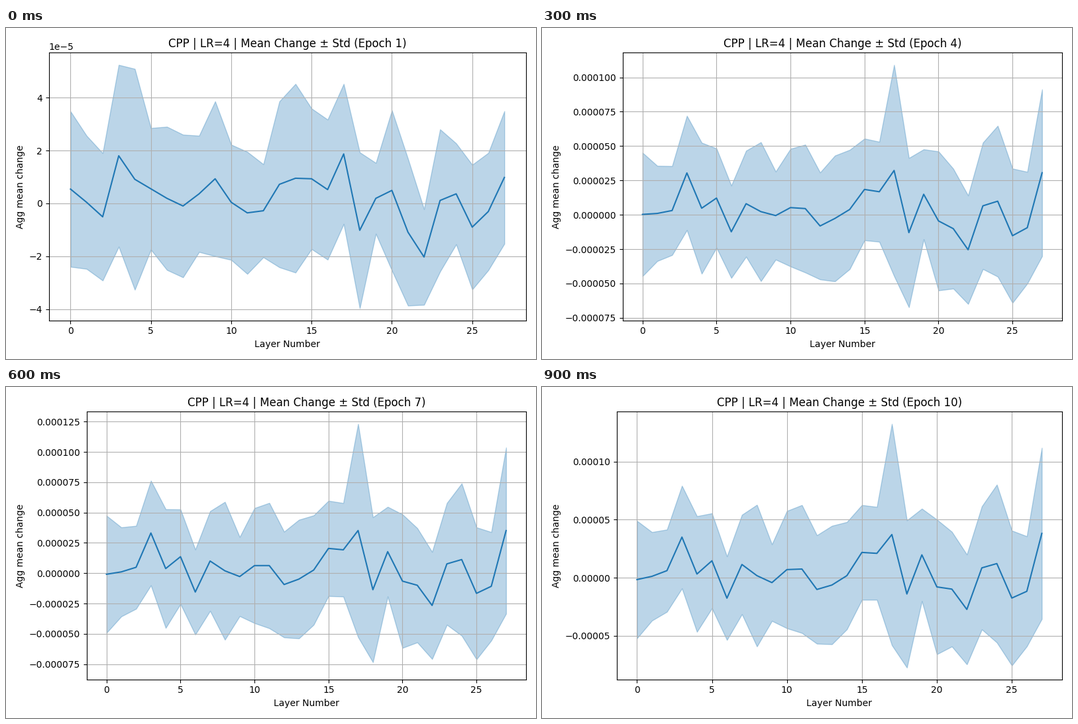
These frames come from a looping animation (800 by 500 pixels, 1 s). A matplotlib script:

```python
import numpy as np
import matplotlib.pyplot as plt
from matplotlib.animation import FuncAnimation

N_EPOCHS, INTERVAL = 10, 100
UNIT = 1e-6
MARGIN = 0.05

# Layer profiles after the first epoch and once training has settled.
START_MEAN = np.array([
    5.4, .4, -5.1, 18, 9.1, 5.5, 1.9, -1, 3.6, 9.3, .4, -3.6, -2.8, 7.2,
    9.5, 9.3, 5.2, 18.7, -10.2, 1.9, 4.9, -10.9, -20.3, 1.1, 3.6, -9, -3.1, 9.8])
START_STD = np.array([
    29.4, 25.2, 24.1, 34.4, 41.8, 23, 27.1, 27, 22, 29.3, 21.8, 23.1, 17.6, 31.4,
    35.7, 26.6, 26.5, 26.5, 29.5, 13.4, 30.3, 27.8, 18.1, 26.9, 19.1, 23.6, 22.2, 25.1])
SETTLED_MEAN = np.array([
    -1.6, 1.2, 6.1, 35, 3.2, 14.6, -17.6, 11.4, 1.8, -4.2, 7, 7.5, -10.1, -6.3,
    1.8, 21.8, 21, 37.2, -14, 19.7, -7.9, -9.8, -27.3, 8.5, 12.2, -17.5, -11.7, 38.2])
SETTLED_STD = np.array([
    50.6, 38.1, 35.4, 44.2, 49.8, 40.9, 36, 42.8, 61, 33, 50.5, 55.1, 46.7, 51,
    46.2, 40.8, 40, 95.3, 63.4, 39.8, 58, 49.4, 47.3, 53, 68, 58.1, 47.4, 73.7])
LAYERS = np.arange(START_MEAN.size)

# The tallest peak sets the pace of every layer; the floor sets the axis.
KEY_EPOCHS = [1, 2, 3, 5, 7, 8, 10]
PEAK = [45.2, 70.6, 99.6, 118.5, 123.1, 131.3, 132.5]
FLOOR = [-39.7, -61.6, -64.3, -71.7, -77.5, -77.7, -77.1]


def blend(start, end, t):
    return start + (end - start) * t


fig, ax = plt.subplots(figsize=(8, 5), dpi=100)


def draw(frame):
    epoch = frame + 1
    peak = np.interp(epoch, KEY_EPOCHS, PEAK)
    progress = (peak - PEAK[0]) / (PEAK[-1] - PEAK[0])
    mean = blend(START_MEAN, SETTLED_MEAN, progress) * UNIT
    std = blend(START_STD, SETTLED_STD, progress) * UNIT
    low = np.interp(epoch, KEY_EPOCHS, FLOOR) * UNIT
    high = (mean + std).max()
    pad = MARGIN * (high - low)

    ax.clear()
    ax.plot(LAYERS, mean, color="tab:blue")
    ax.fill_between(LAYERS, mean - std, mean + std, color="tab:blue", alpha=0.3)
    ax.set_ylim(low - pad, high + pad)
    ax.set_title(f"CPP | LR=4 | Mean Change ± Std (Epoch {epoch})")
    ax.set_xlabel("Layer Number")
    ax.set_ylabel("Agg mean change")
    ax.grid(True)
    fig.tight_layout()


anim = FuncAnimation(fig, draw, frames=N_EPOCHS, init_func=lambda: None,
                     interval=INTERVAL, repeat=True, repeat_delay=0)
plt.show()
```
